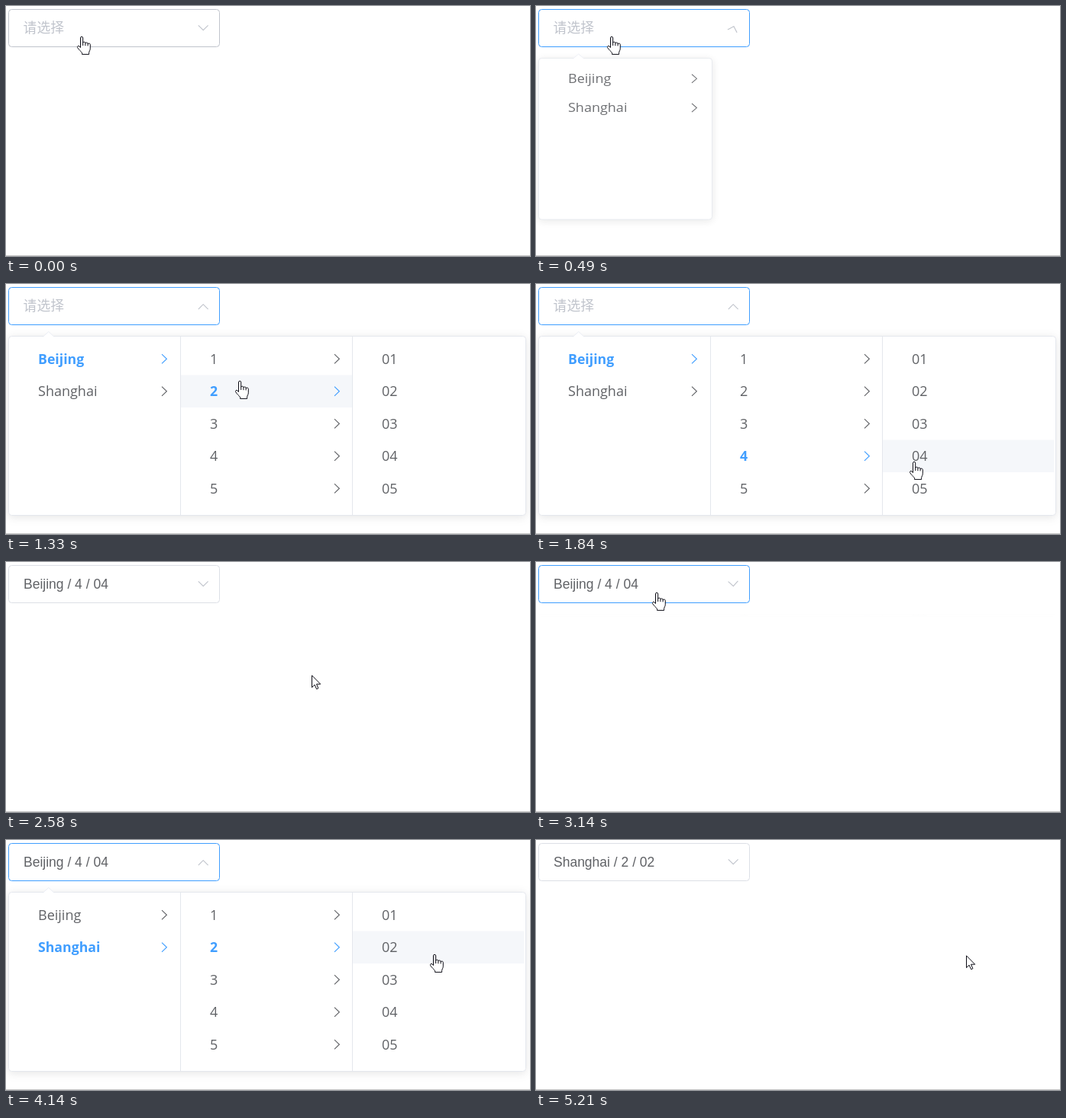
An HTML page that plays this animation: 686x328 px, repeating every 5.26 s.

```html
<!DOCTYPE html>
<html lang="zh">
<head>
<meta charset="utf-8">
<title>Cascader</title>
<style>
  html, body { margin: 0; width: 100%; height: 100%; overflow: hidden; background: #fff; }
  svg { display: block; }
  .value { font: 17.5px "Liberation Sans", Arial, sans-serif; fill: #606266; }
  .hint { font: 17.8px "Noto Sans CJK SC", "Noto Sans CJK", sans-serif; fill: #c0c4cc; }
  .row { font: 18px "Open Sans", "Noto Sans", sans-serif; fill: #606266; stroke: #606266; }
  .row.on { font-weight: 700; font-size: 17.7px; fill: #409eff; stroke: #409eff; }
  .row text { stroke: none; }
  .line { fill: none; stroke-width: 1.1; }
  #box { filter: drop-shadow(0 2.5px 6px rgba(0, 0, 0, .1)); }
  .cursor { fill: #fff; stroke: #0b0b14; stroke-linejoin: round; }
</style>
</head>
<body>
<svg width="686" height="328" viewBox="0 0 686 328">
  <rect y="327" width="686" height="1" fill="#c6c6c6"/>
  <rect id="field" x="3.5" y="4.5" width="276" height="49" rx="4" fill="#fff"/>
  <text id="hint" class="hint" x="22.6" y="35.3">请选择</text>
  <text id="value" class="value" x="23" y="35"></text>
  <path id="caret" class="line" d="M251.8 25.3l6.4 6.4 6.4-6.4" stroke="#c0c4cc"/>
  <g id="popup">
    <rect id="box" x="3.5" y="68.5" height="235" rx="4" fill="#fff" stroke="#e4e7ed"/>
    <path d="M48.5 69.2L55.7 62.5L62.9 69.2" fill="#fff" stroke="#ebeef5"/>
    <rect id="hover" height="42.5" fill="#f5f7fa"/>
    <g id="cols"></g>
  </g>
  <circle id="ring" r="15" fill="rgba(255,255,0,.47)"/>
  <g id="hand" class="cursor">
    <path d="M-1.5 14.5V1.9a1.6 1.6 0 0 1 3.2 0V8.2c.2-1.4 3.2-1.4 3.2.3v.4c.2-1.4 3.2-1.3 3.2.4v.6c.3-1.3 3.2-1.2 3.2.8v5.1c0 2.2-1.6 3.8-1.7 5.6v2H.6v-1.8C-1 19-3.8 17.6-5.3 14.6c-.8-1.8 1-3 2.4-1.7z"/>
    <path d="M1.7 8v4M4.9 8.8v3.4M8.1 9.6v2.8" fill="none"/>
  </g>
  <path id="arrow" class="cursor" d="M.5.8V16.6l3.6-3.5 2.5 5.6 2.3-1-2.4-5.5h5.2z"/>
</svg>
<script>
const LOOP = 5260, FADE = 300, PRESS = 150;
const TOP = 77, ROW = 42.5, LEFT = 4, COL = 225;
const lists = [["Beijing", "Shanghai"], ["1", "2", "3", "4", "5"], ["01", "02", "03", "04", "05"]];

// The popup opens and closes on a click; closing keeps the picked rows
const sessions = [
  { open: 380, close: 2170, pick: [0, 3, 3] },
  { open: 3140, close: 4620, pick: [1, 1, 1] },
];

// Pointer moves: start, end, x, y; it rests in between
const home = [99, 40];
const hops = [
  [570, 780, 102, 78], [870, 1180, 290, 93], [1180, 1740, 349, 220], [1740, 1840, 495, 233],
  [2170, 2530, 431, 161], [2530, 2580, 400, 148], [2600, 2990, 158, 40],
  [3140, 3360, 147, 125], [3700, 4140, 561, 150], [5200, 5210, 563, 151],
];

const $ = id => document.getElementById(id);
const show = (el, on) => { el.style.display = on ? "" : "none"; };
const set = (el, attrs) => { for (const k in attrs) el.setAttribute(k, attrs[k]); };
const clamp = p => Math.min(1, Math.max(0, p));
const ease = p => 1 - (1 - clamp(p)) ** 5;
const columns = path => Math.min(lists.length, path.length + 1);

$("cols").innerHTML = lists.map((list, c) => {
  const x = LEFT + COL * c;
  const rule = c ? `<path d="M${x - .5} 69V303" stroke="#e4e7ed"/>` : "";
  const rows = list.map((label, r) => {
    const y = TOP + ROW * (r + .5);
    const mark = c < 2 ? `<path class="line" d="M${x + 200 + c} ${y - 6.2}l6.4 6.2-6.4 6.2"/>` : "";
    return `<g class="row"><text x="${x + 38}" y="${y + 6.6}">${label}</text>${mark}</g>`;
  }).join("");
  return `<g>${rule}${rows}</g>`;
}).join("");
const cols = [...$("cols").children].map(g => ({ g, rows: [...g.querySelectorAll(".row")] }));

function pointer(t) {
  let [x, y] = home;
  for (const [a, b, toX, toY] of hops) {
    const p = clamp((t - a) / (b - a));
    x += (toX - x) * p;
    y += (toY - y) * p;
  }
  return [x, y];
}

// Column and row under a point, or null
function cell([x, y], path) {
  const c = Math.floor((x - LEFT) / COL), r = Math.floor((y - TOP) / ROW);
  return c >= 0 && c < columns(path) && r >= 0 && r < lists[c].length ? [c, r] : null;
}

// Rows expand under the pointer, so replay its way since the popup opened
function pathAt(t) {
  let path = [];
  for (const { open, close, pick } of sessions) {
    if (t < open) break;
    for (let s = open; s <= t && s < close; s += 10) {
      const hit = cell(pointer(s), path);
      if (hit && hit[0] < 2) path = [...path.slice(0, hit[0]), hit[1]];
    }
    if (t >= close) path = pick;
  }
  return path;
}

function draw(t) {
  const spot = pointer(t), [x, y] = spot, path = pathAt(t), count = columns(path);
  const open = sessions.reduce((sum, s) =>
    sum + ease((t - s.open) / FADE) - ease((t - s.close) / FADE), 0);
  const visible = open > .004;
  const active = sessions.some(s => t >= s.open && t < s.close);
  const focus = sessions.some(s => t >= s.open - PRESS && t < s.close);
  const pressed = sessions.some(s => [s.open, s.close].some(end => t >= end - PRESS && t < end));
  const done = sessions.filter(s => t >= s.close).pop();
  const onField = x < 280 && y < 54;
  const onPopup = visible && y > 68 && x < LEFT + COL * count;

  set($("field"), { stroke: focus ? "#409eff" : onField ? "#c0c4cc" : "#dcdfe6" });
  $("value").textContent = done ? done.pick.map((r, c) => lists[c][r]).join(" / ") : "";
  show($("hint"), !done);
  set($("caret"), { transform: `rotate(${-180 * open} 258.2 29.2)` });

  show($("popup"), visible);
  set($("popup"), { transform: `translate(0 ${68 * (1 - open)}) scale(1 ${open})`, opacity: open });
  set($("box"), { width: COL * count + 2 });
  cols.forEach(({ g, rows }, c) => {
    show(g, c < count);
    rows.forEach((row, r) => row.classList.toggle("on", path[c] === r));
  });

  const hit = active && cell(spot, path);
  show($("hover"), hit);
  if (hit) set($("hover"), { x: LEFT + COL * hit[0], y: TOP + ROW * hit[1], width: COL - 1 });

  show($("hand"), onField || onPopup);
  show($("arrow"), !onField && !onPopup);
  show($("ring"), pressed);
  const at = `translate(${Math.round(x)} ${Math.round(y)})`;
  for (const id of ["arrow", "hand", "ring"]) set($(id), { transform: at });
}

const start = performance.now();
function tick() {
  draw((performance.now() - start) % LOOP);
  requestAnimationFrame(tick);
}
tick();
</script>
</body>
</html>
```
